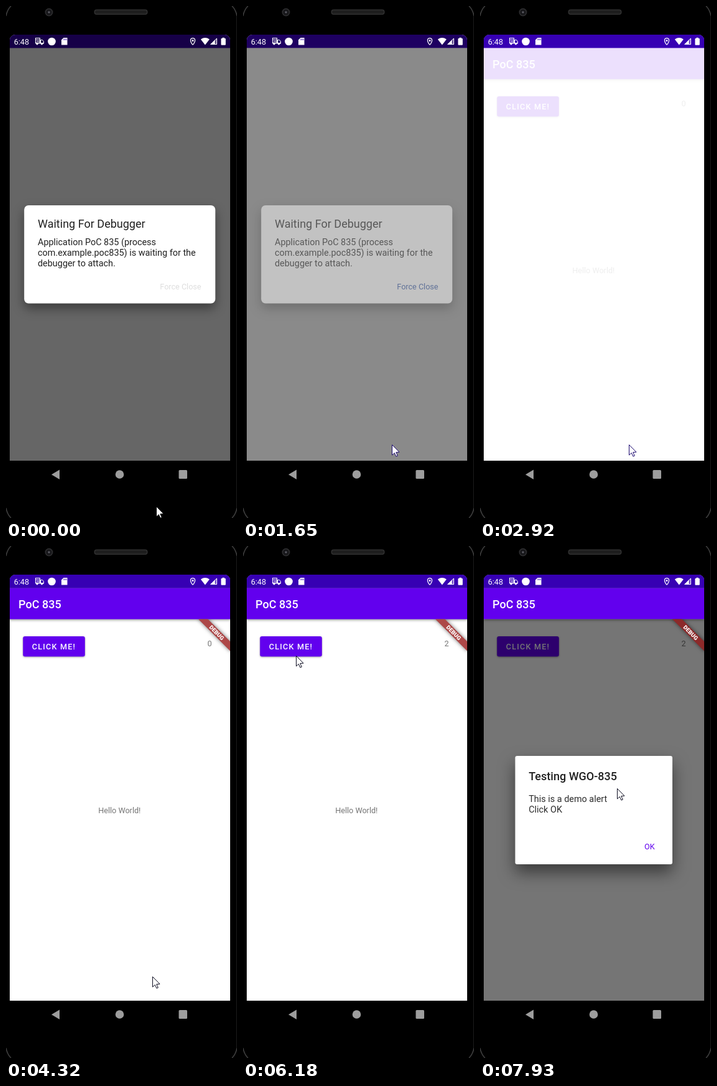
These frames come from a looping animation (371x822 px, 8000 ms). An HTML page with a canvas:

```html
<!DOCTYPE html>
<html lang="en">
<head>
<meta charset="utf-8">
<title>Phone emulator demo</title>
<style>
html, body { margin: 0; width: 100%; height: 100%; overflow: hidden; background: #000; }
canvas { display: block; width: 371px; height: 822px; }
</style>
</head>
<body>
<canvas id="stage"></canvas>
<script>
const W = 371, H = 822, LOOP = 8000;
const canvas = document.getElementById('stage');
const g = canvas.getContext('2d');
const dpr = window.devicePixelRatio || 1;
canvas.width = Math.round(W * dpr);
canvas.height = Math.round(H * dpr);

// Pixels per dp on the emulated screen
const DP = 354 / 392.73;
const SMALL = 14 * DP, BODY = 16 * DP, TITLE = 20 * DP;
const SCREEN = { x: 6, y: 46, w: 354, h: 684 };
const BAR_TOP = 67, BAR_BOTTOM = 117.5;
const PURPLE = '#6200ee';

// Held values: [start, value]
const SCRIM = [[0, 0.6], [1650, 0.46], [1720, 0.18], [1780, 0]];
const WAIT_ALPHA = [[0, 1], [1650, 0.48], [1720, 0.1], [1780, 0]];
const APP_ALPHA = [[0, 0], [2920, 0.12], [2990, 0.65], [3060, 1]];
const COUNT = [[0, 0], [5410, 1], [5970, 2]];
const PRESS = [
  [0, 0], [5210, 0.4], [5340, 1], [5410, 0.7], [5550, 0.3], [5620, 0],
  [5760, 0.4], [5830, 0.8], [5900, 1], [5970, 0.8], [6040, 0.5], [6110, 0.25], [6180, 0]
];
// Pointer moves: start, end, number of positions, from, to
const MOVES = [
  { a: 1120, b: 1250, n: 3, lead: 1, from: [241, 803], to: [239, 704] },
  { a: 4320, b: 5080, n: 12, lead: 0, from: [235, 691], to: [85, 176] },
  { a: 7450, b: 7930, n: 7, lead: 1, from: [85, 176], to: [220, 389] }
];

function held(track, t) {
  let value = track[0][1];
  for (const [start, v] of track) if (t >= start) value = v;
  return value;
}

function pointerAt(t) {
  let pos = MOVES[0].from;
  for (const m of MOVES) {
    if (t < m.a) break;
    const k = Math.min(m.n - 1, Math.floor((t - m.a) / (m.b - m.a) * (m.n - 1) + 0.05));
    const u = (k + m.lead) / (m.n - 1 + m.lead);
    const e = u * u * (3 - 2 * u);
    pos = m.from.map((v, i) => Math.round(v + (m.to[i] - v) * e));
  }
  return pos;
}

function rect(x, y, w, h, fill) {
  g.fillStyle = fill;
  g.fillRect(x, y, w, h);
}

function roundRect(x, y, w, h, r, fill) {
  g.beginPath();
  g.roundRect(x, y, w, h, r);
  g.fillStyle = fill;
  g.fill();
}

function disc(x, y, r, fill) {
  g.beginPath();
  g.arc(x, y, r, 0, Math.PI * 2);
  g.fillStyle = fill;
  g.fill();
}

function poly(points, fill, stroke) {
  g.beginPath();
  points.forEach(([x, y]) => g.lineTo(x, y));
  g.closePath();
  if (fill) { g.fillStyle = fill; g.fill(); }
  if (stroke) { g.strokeStyle = stroke; g.lineWidth = 1; g.stroke(); }
}

function text(str, x, y, size, color, weight = 400, spacing = 0) {
  g.font = `${weight} ${size}px Roboto, sans-serif`;
  g.letterSpacing = spacing + 'px';
  g.fillStyle = color;
  g.fillText(str, x, y);
}

// Canvas shadows ignore the transform, so scale them by hand
function shadowed(blur, dy, alpha, draw) {
  g.save();
  g.shadowColor = `rgba(0,0,0,${alpha})`;
  g.shadowBlur = blur * dpr;
  g.shadowOffsetY = dy * dpr;
  draw();
  g.restore();
}

function drawBody() {
  rect(0, 0, W, H, '#000');
  g.strokeStyle = '#3c3c3c';
  g.lineWidth = 1.6;
  for (const [x, sx] of [[0, 1], [W, -1]]) {
    for (const [y, sy] of [[0, 1], [H, -1]]) {
      g.beginPath();
      g.moveTo(x, y + sy * 16);
      g.quadraticCurveTo(x + sx * 2, y + sy * 6, x + sx * 8, y);
      g.stroke();
    }
  }
  rect(370, 16, 1, H - 32, '#1c1c1c');
  disc(69, 10, 6.5, '#2b2b2d');
  disc(69, 10, 4.5, '#141416');
  disc(69, 10, 2.5, '#2c2c32');
  disc(69, 10, 1, '#77777c');
  roundRect(141.5, 5.5, 86, 8.5, 4, '#303030');
  roundRect(143, 7, 83, 5.5, 2.7, '#1e1e1e');
}

function drawNav() {
  const grey = '#9d9d9d';
  poly([[86, 744.5], [86, 760], [73, 752.2]], grey);
  disc(182.5, 752, 6.8, grey);
  roundRect(277.5, 745, 13.5, 14, 1.5, grey);
}

function drawTruck() {
  g.strokeStyle = '#fff';
  g.lineWidth = 1;
  g.strokeRect(47.5, 51.5, 7, 7.5);
  rect(48, 53.5, 6, 1, '#fff');
  rect(49, 56, 5, 1, '#fff');
  poly([[55.5, 54.5], [58.5, 54.5], [60.5, 57], [60.5, 60], [55.5, 60]], null, '#fff');
  rect(47, 59, 14, 1.3, '#fff');
  disc(50, 60.7, 1.7, '#fff');
  disc(57.5, 60.7, 1.7, '#fff');
}

function drawStatusIcons() {
  text('6:48', 12.7, 61.6, SMALL, '#fff');
  drawTruck();
  disc(73.5, 57, 6.3, '#fff');

  poly([[92.5, 51], [98.5, 51], [98.5, 62.5], [89, 62.5], [89, 54.5]], '#fff');
  for (const x of [92.5, 94.5, 96.5]) rect(x, 52.5, 0.9, 2.4, '#3700b3');

  g.beginPath();
  g.moveTo(300, 62.3);
  g.bezierCurveTo(294.7, 56.5, 295.8, 51.6, 300, 51.6);
  g.bezierCurveTo(304.2, 51.6, 305.3, 56.5, 300, 62.3);
  g.strokeStyle = '#fff';
  g.lineWidth = 1.2;
  g.stroke();
  disc(300, 55.6, 1.5, '#fff');

  g.beginPath();
  g.moveTo(319.8, 62.5);
  g.lineTo(312.8, 53.5);
  g.quadraticCurveTo(319.8, 48.6, 326.8, 53.5);
  g.closePath();
  g.fillStyle = '#fff';
  g.fill();

  poly([[339, 51], [339, 62], [328, 62]], 'rgba(255,255,255,.3)');
  poly([[335.5, 54.5], [335.5, 62], [328, 62]], '#fff');
  poly([[338.5, 52], [338.5, 61.5], [329, 61.5]], null, '#fff');

  roundRect(345.4, 52, 7.4, 10.7, 1, '#fff');
  rect(347.4, 50.8, 3.4, 1.5, '#fff');
}

function drawButton(press) {
  shadowed(3 + press * 8, 1 + press * 3, 0.35, () =>
    roundRect(27.3, 145, 99.5, 32.5, 3.2, PURPLE));
  if (press) {
    g.save();
    g.beginPath();
    g.roundRect(27.3, 145, 99.5, 32.5, 3.2);
    g.clip();
    rect(27, 145, 100, 33, `rgba(255,255,255,${0.08 * press})`);
    disc(85, 176, 30 + 50 * press, `rgba(255,255,255,${0.18 * press})`);
    g.restore();
  }
  text('CLICK ME!', 41.8, 166, SMALL, '#fff', 500, 1.2);
}

function drawBanner() {
  const near = 28 * DP, thick = 12 * DP;
  g.save();
  g.beginPath();
  g.rect(SCREEN.x, BAR_BOTTOM, SCREEN.w, 300);
  g.clip();
  g.translate(SCREEN.x + SCREEN.w, BAR_BOTTOM);
  g.rotate(Math.PI / 4);
  const strip = [-40 * DP, near, 80 * DP, thick];
  shadowed(6, 0, 0.5, () => rect(...strip, '#000'.slice(0, 4) + '8'));
  rect(...strip, '#ad4848');
  g.restore();
}

function drawRibbon(dimmed) {
  const near = 28 * DP, thick = 12 * DP;
  g.save();
  g.beginPath();
  g.rect(SCREEN.x, BAR_BOTTOM, SCREEN.w, 300);
  g.clip();
  g.translate(SCREEN.x + SCREEN.w, BAR_BOTTOM);
  g.rotate(Math.PI / 4);
  shadowed(6, 0, 0.55, () =>
    rect(-40 * DP, near, 80 * DP, thick, dimmed ? '#8c2a2a' : '#ad4848'));
  g.textAlign = 'center';
  text('DEBUG', 0, near + thick / 2 + 3.2, 10.2 * DP, '#fff', 900);
  g.restore();
}

function drawAlert() {
  rect(SCREEN.x, BAR_BOTTOM, SCREEN.w, 730 - BAR_BOTTOM, 'rgba(0,0,0,.54)');
  shadowed(26, 13, 0.5, () => roundRect(56.5, 337, 252.5, 174, 3.2, '#fff'));
  text('Testing WGO-835', 78.2, 376, TITLE, '#212121', 500);
  text('This is a demo alert', 78.2, 411, BODY, '#2c2c2c');
  text('Click OK', 78.2, 428, BODY, '#2c2c2c');
  text('OK', 264, 486.7, SMALL, PURPLE);
}

function drawApp(t) {
  const alpha = held(APP_ALPHA, t);
  if (!alpha) return;
  shadowed(4, 1.5, 0.4, () =>
    rect(SCREEN.x, BAR_TOP + 0.5, SCREEN.w, BAR_BOTTOM - BAR_TOP - 0.5, PURPLE));
  rect(SCREEN.x, SCREEN.y, SCREEN.w, BAR_TOP + 0.5 - SCREEN.y, '#3700b3');
  text('PoC 835', 20, 100, TITLE, '#fff', 500);
  drawButton(held(PRESS, t));
  text(String(held(COUNT, t)), 323.6, 160.6, SMALL, '#757575');
  text('Hello World!', 148.3, 429.4, SMALL, '#757575');
  if (alpha < 1) {
    rect(SCREEN.x, BAR_TOP + 0.5, SCREEN.w, 663, `rgba(255,255,255,${1 - alpha})`);
  }
  const alertOpen = t >= 6920;
  if (alertOpen) drawAlert();
  if (t >= 3590) drawRibbon(alertOpen);
}

function drawWaiting(t) {
  const alpha = held(WAIT_ALPHA, t);
  if (!alpha) return;
  const dim = held(SCRIM, t);
  rect(SCREEN.x, SCREEN.y, SCREEN.w, SCREEN.h, `rgba(0,0,0,${dim})`);
  shadowed(18, 8, 0.42, () => roundRect(29.2, 320, 307, 157.5, 7, '#fff'));
  text('Waiting For Debugger', 51, 356, TITLE, '#212121');
  text('Application PoC 835 (process', 51, 383.8, BODY, '#212121');
  text('com.example.poc835) is waiting for the', 51, 400.7, BODY, '#212121');
  text('debugger to attach.', 51, 417.6, BODY, '#212121');
  text('Force Close', 247.3, 454.6, SMALL, t < 190 ? '#dedede' : '#3358a8');
  if (alpha < 1) {
    const v = Math.round(255 * (1 - dim));
    rect(SCREEN.x, BAR_TOP + 0.5, SCREEN.w, 663, `rgba(${v},${v},${v},${1 - alpha})`);
  }
}

function drawPointer(t) {
  const [x, y] = pointerAt(t);
  const arrow = [[0, 0], [0, 16.5], [3.8, 13], [6.4, 18.6], [8.8, 17.6], [6.3, 12], [11.5, 11.7]];
  const edge = t < 1120 ? '#000' : t < 4320 ? '#1c0a70' : '#0c0c20';
  poly(arrow.map(([px, py]) => [x + 0.5 + px, y + 0.5 + py]), '#fff', edge);
}

function draw(t) {
  g.setTransform(dpr, 0, 0, dpr, 0, 0);
  drawBody();
  g.save();
  g.beginPath();
  g.roundRect(SCREEN.x, SCREEN.y, SCREEN.w, SCREEN.h, [9, 9, 0, 0]);
  g.clip();
  rect(SCREEN.x, SCREEN.y, SCREEN.w, SCREEN.h, '#fff');
  rect(SCREEN.x, SCREEN.y, SCREEN.w, BAR_TOP + 0.5 - SCREEN.y, '#3700b3');
  drawWaiting(t);
  drawApp(t);
  drawStatusIcons();
  g.restore();
  drawNav();
  drawPointer(t);
}

const begin = performance.now();
function tick() {
  draw((performance.now() - begin) % LOOP);
  requestAnimationFrame(tick);
}
draw(0);
requestAnimationFrame(tick);
</script>
</body>
</html>
```
